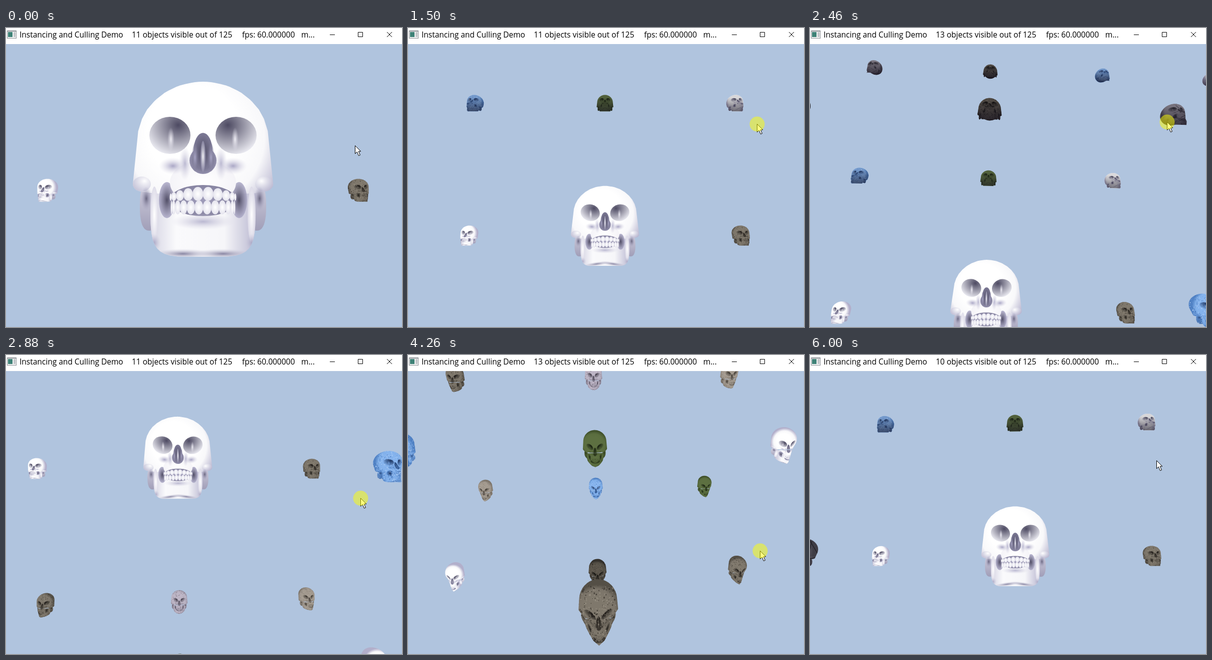
Write an HTML page with a canvas that moves like this. It is 790x596 px and loops after 6.06 s.

```html
<!DOCTYPE html>
<html lang="en">
<head>
<meta charset="utf-8">
<title>Instancing and Culling Demo</title>
<style>
html, body { margin: 0; width: 100%; height: 100%; overflow: hidden; background: #b0c4de; }
canvas { display: block; }
</style>
</head>
<body>
<canvas id="stage" width="790" height="596"></canvas>
<script>
const ctx = document.getElementById('stage').getContext('2d');
const W = 790, H = 596, LOOP = 6060, STEP = 60;
const FOCAL = 724, CX = 393, CY = 332, EYE_Y = 2, NEAR_DIST = 15, FAR_DIST = 32.7;
const clamp = (v, low = 0, high = 1) => Math.min(high, Math.max(low, v));

// Smooth curve through [time, value] keys that never overshoots them.
function track(...keys) {
  const slope = i => (keys[i + 1][1] - keys[i][1]) / (keys[i + 1][0] - keys[i][0]);
  const tangent = i => {
    if (i === 0 || i === keys.length - 1) return 0;
    const a = slope(i - 1), b = slope(i);
    return a * b <= 0 ? 0 : 2 * a * b / (a + b);
  };
  return t => {
    let i = 0;
    while (i < keys.length - 2 && t > keys[i + 1][0]) i++;
    const [t0, v0] = keys[i], [t1, v1] = keys[i + 1], d = t1 - t0;
    const u = clamp((t - t0) / d), w = 1 - u;
    return v0 * w * w * (1 + 2 * u) + v1 * u * u * (3 - 2 * u)
      + d * (tangent(i) * u * w * w - tangent(i + 1) * u * u * w);
  };
}

// Camera angles in degrees. The mouse that drags them runs a little ahead, at 4 px per degree.
const pitchAt = track([1150, 0], [1920, 20.3], [2240, 25.5], [2880, -7.7],
  [3900, -46], [4260, -41.8], [5040, -8], [5560, 6]);
const yawAt = track([2050, 0], [2650, 4.1], [2880, 3.9], [3030, 2.6], [4260, 1.8], [5040, -0.85], [5560, -1.3]);
const MOUSE_LEAD = 110;
const visibleCounts = [[0, 11], [1800, 13], [2700, 11], [3600, 13], [4700, 14], [5600, 10]];

function makeCamera(t) {
  const yaw = yawAt(t) * Math.PI / 180, pitch = pitchAt(t) * Math.PI / 180;
  const back = NEAR_DIST + (FAR_DIST - NEAR_DIST) * clamp(t / 1040);
  const cy = Math.cos(yaw), sy = Math.sin(yaw), cp = Math.cos(pitch), sp = Math.sin(pitch);
  return (x, y, z) => {
    y -= EYE_Y;
    z += back;
    const side = x * cy - z * sy, ahead = x * sy + z * cy;
    const depth = ahead * cp + y * sp;
    return [CX + FOCAL * side / depth, CY - FOCAL * (y * cp - ahead * sp) / depth, depth];
  };
}

// The face is laid out in pixels as seen from straight ahead, then lifted onto a
// curved front that juts out towards the chin.
function lift(dx, y) {
  const forward = 1.3 + 2.2 * clamp((y - 230) / 110);
  const z = -forward * Math.cos(dx / 104 * Math.PI / 2), s = (NEAR_DIST + z) / FOCAL;
  return [dx * s, EYE_Y + (CY - y) * s, z];
}
function ring(cx, cy, rx, ry, power = 2) {
  const bend = v => Math.sign(v) * Math.abs(v) ** (2 / power);
  return Array.from({ length: 40 }, (_, i) => {
    const a = i * Math.PI / 20;
    return lift(cx + rx * bend(Math.cos(a)), cy + ry * bend(Math.sin(a)));
  });
}

const cranium = [...ring(122, 311, 18, 15), ...ring(-122, 311, 18, 15)];
for (let i = 0; i <= 18; i++) for (let j = 0; j < 36; j++) {
  const a = i * Math.PI / 18, b = j * Math.PI / 18, r = Math.sin(a);
  cranium.push([3.02 * r * Math.cos(b), 4.4 + 2.67 * Math.cos(a), 2 + 3.5 * r * Math.sin(b)]);
}
const jaw = ring(0, 330, 105, 126, 5).filter(p => p[1] < EYE_Y + .1);
const mastoids = [-1, 1].map(side => ring(side * 107, 355, 19, 49, 2.5));

// Elliptic patches of tone, mirrored unless centred; fade is the alpha at the rim,
// focus moves the inner tone off centre.
const patches = [];
function patch(x, y, rx, ry, inner, outer, fade = 1, focus = [0, 0]) {
  for (const side of x ? [-1, 1] : [1])
    patches.push({ x: x * side, y, rx: rx * side, ry, inner, outer, fade, focus });
}
patch(122, 311, 18, 15, 1, .6, .6, [-.3, -.4]);
patch(72, 343, 16, 36, .1, .5, .8);
patch(113, 340, 11, 24, .2, .5, 0);
patch(97, 372, 8, 56, 1, .8, .9);
patch(0, 308, 66, 44, 1, .94);
patch(60, 275, 28, 17, .5, .8, 0);
patch(36, 270, 12, 34, .6, .8, 0);
patch(66, 214, 41, 37, .08, .88, 1, [-.4, -.55]);
patch(64, 222, 7, 24, .9, .8, 0);
patch(0, 264, 27, 27, .1, .4);
patch(0, 246, 19, 37, .1, .3);
patch(16, 258, 6, 28, .5, .3, .3);
patch(0, 256, 5, 31, .95, .4, .7);
patch(0, 344, 67, 31, .45, .35);
for (const { count, reach, top, bottom, curve } of [
  { count: 5, reach: 66, top: 317, bottom: 344, curve: 14 },
  { count: 6, reach: 64, top: 344, bottom: 371, curve: 0 }
]) {
  const edge = i => reach * Math.sin(i / count * Math.PI / 2);
  for (let i = 0; i < count; i++) {
    const x = (edge(i) + edge(i + 1)) / 2, y = top + curve * (x / reach) ** 2;
    patch(x, (y + bottom) / 2, (edge(i + 1) - edge(i)) / 2 + .5, (bottom - y) / 2 + .5, 1, .85);
  }
}
patch(0, 386, 64, 16, .6, .8, 0);
patch(40, 450, 60, 10, .35, .7, 0);
patch(98, 428, 14, 18, .5, .7, 0);

// Tones dark, base, light; then the surface pattern.
const materials = {
  W: ['#3c394f', '#a9a6c5', '#ffffff'],
  S: ['#120f0c', '#4f4a42', '#7f786c', 'speckle', '#1c1814', '#aca395'],
  D: ['#0b0a08', '#302d28', '#5c564c', 'speckle', '#12100d', '#81796a'],
  B: ['#14264d', '#4a7cc0', '#86b4ee', 'speckle', '#2c5ca4', '#d4e8ff'],
  G: ['#10170a', '#3c4c27', '#5d7041'],
  C: ['#1d1b22', '#56525d', '#8e8993', 'crack', '#1c1a20'],
  K: ['#15141a', '#3c3a43', '#56535e', 'crack', '#121116'],
  T: ['#2a251f', '#776f66', '#a59c91', 'speckle', '#6a6158', '#bdb4aa'],
  P: ['#35303c', '#857e90', '#beb6c6', 'speckle', '#403946', '#d0c8d8']
};
const rgb = hex => [1, 3, 5].map(i => parseInt(hex.slice(i, i + 2), 16));
function tone(material, value, alpha = 1) {
  const v = value * 2, i = v < 1 ? 0 : 1, from = rgb(material[i]), to = rgb(material[i + 1]);
  return `rgba(${from.map((c, k) => Math.round(c + (to[k] - c) * (v - i)))},${alpha})`;
}

// Rows run from y = 100 down to -100, letters from x = -100 to 100.
const layers = {
  0: ['WSTBG', 'BDGCW', 'SKWBT', 'GBSWS', 'TWDSB'],
  50: ['SWTBG', 'BDDCW', 'SKWBT', 'TBGWS', 'PWDSB'],
  100: ['GCDBW', 'TBGWS', 'DWTSC', 'BSPTG', 'WTBGC']
};
const skulls = [];
for (const z in layers) layers[z].forEach((row, j) => [...row].forEach((letter, i) =>
  skulls.push({ x: i * 50 - 100, y: 100 - j * 50, z: +z, material: materials[letter], seed: i * 31 + j * 7 + +z + 1 })));

function random(seed) {
  return () => (seed = seed * 16807 % 2147483647) / 2147483647;
}

function hull(points) {
  const sorted = [...points].sort((a, b) => a[0] - b[0] || a[1] - b[1]);
  const half = list => {
    const out = [];
    for (const p of list) {
      while (out.length > 1) {
        const [a, b] = out.slice(-2);
        if ((b[0] - a[0]) * (p[1] - a[1]) - (b[1] - a[1]) * (p[0] - a[0]) > 0) break;
        out.pop();
      }
      out.push(p);
    }
    out.pop();
    return out;
  };
  const path = new Path2D();
  [...half(sorted), ...half(sorted.reverse())].forEach(([x, y]) => path.lineTo(x, y));
  path.closePath();
  return path;
}
function fill(path, gradient, ...stops) {
  stops.forEach(([offset, color]) => gradient.addColorStop(offset, color));
  ctx.fillStyle = gradient;
  ctx.fill(path);
}

const unitDisc = new Path2D();
unitDisc.arc(0, 0, 1, 0, 2 * Math.PI);

function drawPatch({ x, y, rx, ry, inner, outer, fade, focus: [fx, fy] }, project, material) {
  const at = (dx, dy) => project(lift(x + dx, y + dy));
  const [ox, oy] = at(0, 0), left = at(-rx, 0), right = at(rx, 0), top = at(0, -ry), bottom = at(0, ry);
  ctx.save();
  ctx.transform((right[0] - left[0]) / 2, (right[1] - left[1]) / 2,
    (bottom[0] - top[0]) / 2, (bottom[1] - top[1]) / 2, ox, oy);
  fill(unitDisc, ctx.createRadialGradient(fx, fy, 0, fx, fy, 1 + Math.hypot(fx, fy)),
    [0, tone(material, inner)], [1, tone(material, outer, fade)]);
  ctx.restore();
}

function drawPattern([, , , kind, dark, light], x, y, unit, seed) {
  const rnd = random(seed * 977 + 13);
  const spot = () => [x + (rnd() * 10 - 5) * unit, y + (rnd() * 9 - 4.5) * unit];
  if (kind === 'speckle') {
    ctx.globalAlpha = .5;
    for (let i = 0; i < 600; i++) {
      const size = (.06 + rnd() * .16) * unit;
      ctx.fillStyle = i % 2 ? dark : light;
      ctx.fillRect(...spot(), size, size * (.5 + rnd()));
    }
  } else if (kind === 'crack') {
    ctx.globalAlpha = .8;
    ctx.strokeStyle = dark;
    ctx.lineWidth = .12 * unit;
    ctx.beginPath();
    for (let i = 0; i < 9; i++) {
      ctx.moveTo(...spot());
      ctx.lineTo(...spot());
    }
    ctx.stroke();
  }
  ctx.globalAlpha = 1;
}

function drawSkull({ x: sx, y: sy, z: sz, material, seed }, camera) {
  const project = p => camera(p[0] + sx, p[1] + sy, p[2] + sz);
  const [x, y, depth] = project([0, 3.4, 0]), unit = FOCAL / depth;
  const shade = value => tone(material, value);
  const head = hull(cranium.map(project)), chin = hull(jaw.map(project));
  const ears = mastoids.map(points => hull(points.map(project)));
  const outline = new Path2D();
  [head, chin, ...ears].forEach(path => outline.addPath(path));

  ears.forEach(path => fill(path, ctx.createLinearGradient(0, y, 0, y + 3.5 * unit), [0, shade(.85)], [1, shade(.4)]));
  fill(head, ctx.createRadialGradient(x - .4 * unit, y - 1.2 * unit, 1.9 * unit, x - .2 * unit, y - .8 * unit, 3.8 * unit),
    [0, shade(1)], [.5, shade(.96)], [1, shade(.55)]);
  fill(chin, ctx.createLinearGradient(x - 2.2 * unit, 0, x + 2.2 * unit, 0),
    [0, shade(.75)], [.25, shade(.97)], [.7, shade(.95)], [1, shade(.6)]);

  ctx.save();
  ctx.clip(outline);
  patches.forEach(p => drawPatch(p, project, material));
  drawPattern(material, x, y, unit, seed);
  // Light falls from above, so undersides go dark.
  const below = clamp((sy - EYE_Y) / depth * 1.9, 0, .75);
  if (below) fill(outline, ctx.createLinearGradient(0, y - 2 * unit, 0, y + 3.8 * unit),
    [0, `rgba(18,14,28,${below * .25})`], [1, `rgba(18,14,28,${below})`]);
  ctx.restore();
}

function box(color, ...rect) {
  ctx.fillStyle = color;
  ctx.fillRect(...rect);
}

function drawTitleBar(count) {
  box('#fff', 0, 0, W, 32);
  box('#8a8f94', 2, 5, 19, 16);
  box('#f4f4f4', 3, 7, 17, 13);
  box('#3f8277', 4, 8, 9, 10);
  box('#c3c7ca', 15, 8, 4, 10);

  ctx.fillStyle = '#000';
  ctx.font = '15.5px "Open Sans", "Noto Sans", sans-serif';
  ctx.fillText('Instancing and Culling Demo', 27, 19);
  ctx.fillText(`${count} objects visible out of 125`, 251, 19);
  ctx.fillText('fps: 60.000000', 471, 19);
  ctx.fillText('m...', 589, 19);

  ctx.strokeStyle = '#000';
  ctx.lineWidth = 1;
  ctx.stroke(new Path2D('M646 13.5h10M702.5 8.5h9v9h-9zM760 8l10 10M770 8l-10 10'));
}

function drawMouse(x, y, pressed) {
  ctx.save();
  ctx.translate(Math.round(x) + .5, Math.round(y) + .5);
  const arrow = new Path2D('M0 0V16L3.8 12.4L7 20L10 18.7L6.8 11.4H11.4Z');
  ctx.fillStyle = '#fff';
  ctx.strokeStyle = '#000';
  ctx.lineWidth = 1;
  ctx.fill(arrow);
  ctx.stroke(arrow);
  if (pressed) {
    ctx.scale(15, 15);
    ctx.fillStyle = 'rgba(255,255,0,.5)';
    ctx.fill(unitDisc);
  }
  ctx.restore();
}

function draw(t) {
  const camera = makeCamera(t);
  box('#b0c4de', 0, 0, W, H);
  skulls.map(skull => ({ skull, at: camera(skull.x, skull.y + 3.4, skull.z) }))
    .filter(({ at: [x, y, depth] }) => {
      const reach = 6 * FOCAL / depth;
      return depth > 8 && x > -reach && x < W + reach && y > 32 - reach && y < H + reach;
    })
    .sort((a, b) => b.at[2] - a.at[2])
    .forEach(({ skull }) => drawSkull(skull, camera));
  drawTitleBar(visibleCounts.filter(([start]) => t >= start).pop()[1]);
  const lead = t + MOUSE_LEAD;
  drawMouse(696 + 4 * yawAt(lead), 234 - 4 * pitchAt(lead), t >= 1100 && t < 5640);
}

const start = performance.now();
function frame() {
  const elapsed = (performance.now() - start) % LOOP;
  draw(Math.floor(elapsed / STEP) * STEP);
  requestAnimationFrame(frame);
}
frame();
</script>
</body>
</html>
```
